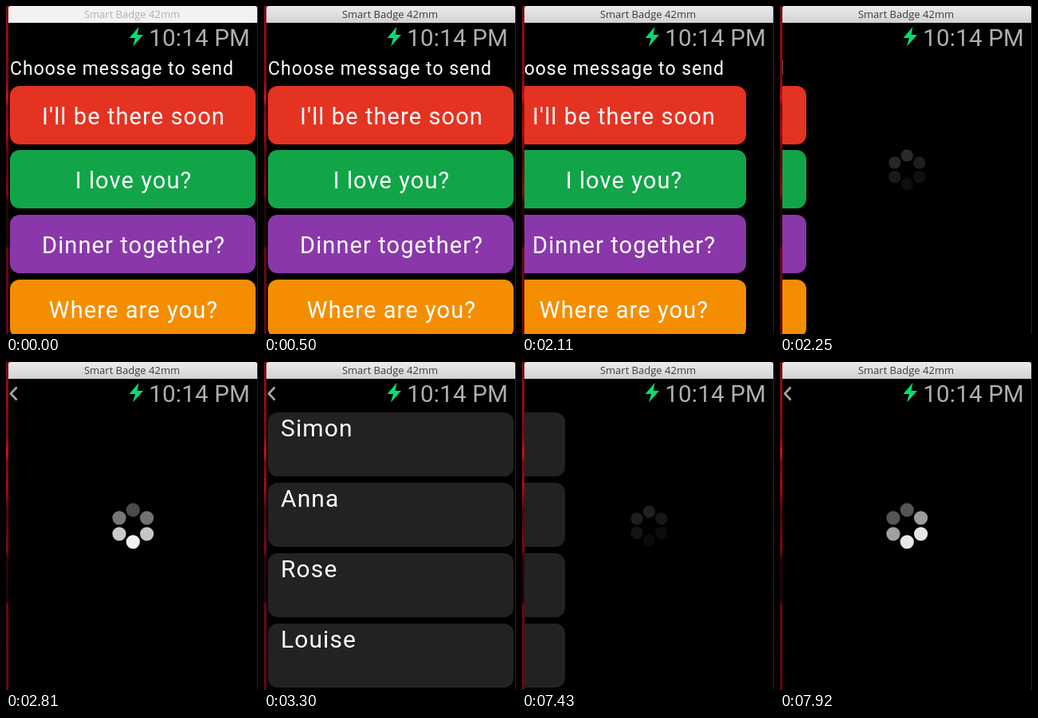
Write an HTML page that moves like this. It is 316 by 410 pixels and loops after 7990 ms.

```html
<!DOCTYPE html>
<html lang="en">
<head>
<meta charset="utf-8">
<title>Message picker</title>
<style>
  html, body { margin: 0; width: 100%; height: 100%; overflow: hidden; background: #000; }
  svg { display: block; width: 316px; height: 410px; }
  text { font-family: Roboto, Inter, sans-serif; fill: #fff; }
  .title { font: 13px "Open Sans", "Noto Sans", sans-serif; text-anchor: middle; }
  .clock { font-size: 29.5px; letter-spacing: .2px; text-anchor: end; fill: #aeaeb4; }
  .heading { font-size: 23px; letter-spacing: 1px; }
  .button { font-size: 29px; letter-spacing: 1.1px; text-anchor: middle; }
  .name { font-size: 30px; letter-spacing: 1.1px; }
</style>
</head>
<body>
<svg viewBox="0 0 316 410">
  <defs>
    <linearGradient id="bar" x2="0" y2="1">
      <stop stop-color="#ebebeb"/><stop offset="1" stop-color="#d2d2d2"/>
    </linearGradient>
    <linearGradient id="desk" x2="0" y2="1">
      <stop stop-color="#6c1014"/><stop offset=".1" stop-color="#980c12"/>
      <stop offset=".22" stop-color="#780a0e"/><stop offset=".28" stop-color="#c81418"/>
      <stop offset=".31" stop-color="#700a0c"/><stop offset=".38" stop-color="#a80c12"/>
      <stop offset=".46" stop-color="#4c0408"/><stop offset=".57" stop-color="#800a0e"/>
      <stop offset=".6" stop-color="#2c0306"/><stop offset=".73" stop-color="#24030a"/>
      <stop offset=".74" stop-color="#680812"/><stop offset="1" stop-color="#640612"/>
    </linearGradient>
    <clipPath id="screen"><rect x="3" y="21" width="312" height="389"/></clipPath>
  </defs>
  <rect width="316" height="410" fill="url(#desk)"/>
  <rect x="315" width="1" height="410" fill="#5a0810"/>
  <rect x="3" y="14" width="312" height="396"/>
  <path id="titleBar" d="M3 21V3q0-3 3-3H312q3 0 3 3V21z"/>
  <text id="title" class="title" x="158" y="15">Smart Badge 42mm</text>
  <g clip-path="url(#screen)">
    <g id="messages"><text class="heading" x="5" y="86">Choose message to send</text></g>
    <g id="people"></g>
    <g id="spinner"></g>
    <path id="back" d="M13.500 31.500L6 39.500 13.500 47.500" fill="none" stroke="#a6a6ac" stroke-width="2.6"/>
    <path d="M166.500 26L154.500 40h7.500L159 50.500 172 36h-7.500z" fill="#04de71"/>
    <text class="clock" x="306" y="50">10:14 PM</text>
  </g>
</svg>
<script>
const LOOP = 7990, FIRST_HOLD = 500, STEP = 70;
const FIRST_PUSH = 2060, SECOND_PUSH = 7255, PEOPLE_SHOWN = 3300, SPINNER_STOP = 2950;

const $ = id => document.getElementById(id);
const clamp = v => Math.min(1, Math.max(0, v));
const progress = (t, start, length) => clamp((t - start) / length);

function add(parent, tag, attributes, content = "") {
  const node = document.createElementNS("http://www.w3.org/2000/svg", tag);
  for (const [key, value] of Object.entries(attributes)) node.setAttribute(key, value);
  node.textContent = content;
  return parent.appendChild(node);
}

function addRow(list, y, height, fill, label, textStyle) {
  const row = add(list, "g", {});
  add(row, "rect", { x: 5, y, width: 308, height, rx: 12, fill });
  add(row, "text", textStyle, label);
  return row;
}

const messageRows = [
  ["I'll be there soon", "#e53322", 100],
  ["I love you?", "#11a548", 180],
  ["Dinner together?", "#8a37aa", 261],
  ["Where are you?", "#f48e00", 342]
].map(([label, fill, y]) =>
  addRow($("messages"), y, 73, fill, label, { class: "button", x: 160, y: y + 48 }));

const peopleRows = ["Simon", "Anna", "Rose", "Louise"].map((label, i) => {
  const y = 63 + 88 * i;
  return addRow($("people"), y, 80, "#222", label, { class: "name", x: 21, y: y + 30 });
});

const dots = Array.from({ length: 6 }, (_, i) => {
  const angle = i * Math.PI / 3;
  return add($("spinner"), "circle",
    { cx: 20 * Math.sin(angle), cy: -20 * Math.cos(angle), r: 8.6, fill: "#fff" });
});

// A pressed row goes half dark at once, then recovers.
const pressOpacity = (t, start, length) => t < start ? 1 : .5 + .5 * progress(t, start, length);

function slide(list, t, start) {
  const eased = .5 - .5 * Math.cos(Math.PI * progress(t, start, 240));
  list.setAttribute("transform", `translate(${Math.round(-312 * eased)} 0)`);
}

function drawSpinner(age) {
  const shown = progress(age, 120, 400);
  const scale = .87 + .13 * shown;
  $("spinner").setAttribute("transform", `translate(159.3 204.8) scale(${scale})`);
  const peak = -88 + .36 * age;
  dots.forEach((dot, i) => {
    const glow = .62 + .33 * Math.cos((60 * i - peak) * Math.PI / 180);
    dot.setAttribute("opacity", shown * glow);
  });
}

function draw(t) {
  const active = t >= FIRST_HOLD;
  $("titleBar").setAttribute("fill", active ? "url(#bar)" : "#f4f1f1");
  $("title").style.fill = active ? "#3c3c3c" : "#b2aeb6";

  messageRows[2].setAttribute("opacity", pressOpacity(t, 1690, 280));
  peopleRows[1].setAttribute("opacity", pressOpacity(t, 6730, 210));
  slide($("messages"), t, FIRST_PUSH);
  slide($("people"), t, SECOND_PUSH);
  $("people").setAttribute("visibility", t >= PEOPLE_SHOWN ? "visible" : "hidden");

  const secondPush = t >= SECOND_PUSH;
  const age = secondPush ? t - SECOND_PUSH : Math.min(t, SPINNER_STOP) - FIRST_PUSH;
  const loading = secondPush || t < PEOPLE_SHOWN;
  $("spinner").setAttribute("visibility", loading ? "visible" : "hidden");
  drawSpinner(age);
  $("back").setAttribute("opacity", loading ? progress(age, 190, 260) : 1);
}

function frame() {
  const t = performance.now() % LOOP;
  draw(t < FIRST_HOLD ? 0 : FIRST_HOLD + Math.floor((t - FIRST_HOLD) / STEP) * STEP);
  requestAnimationFrame(frame);
}
frame();
</script>
</body>
</html>
```
